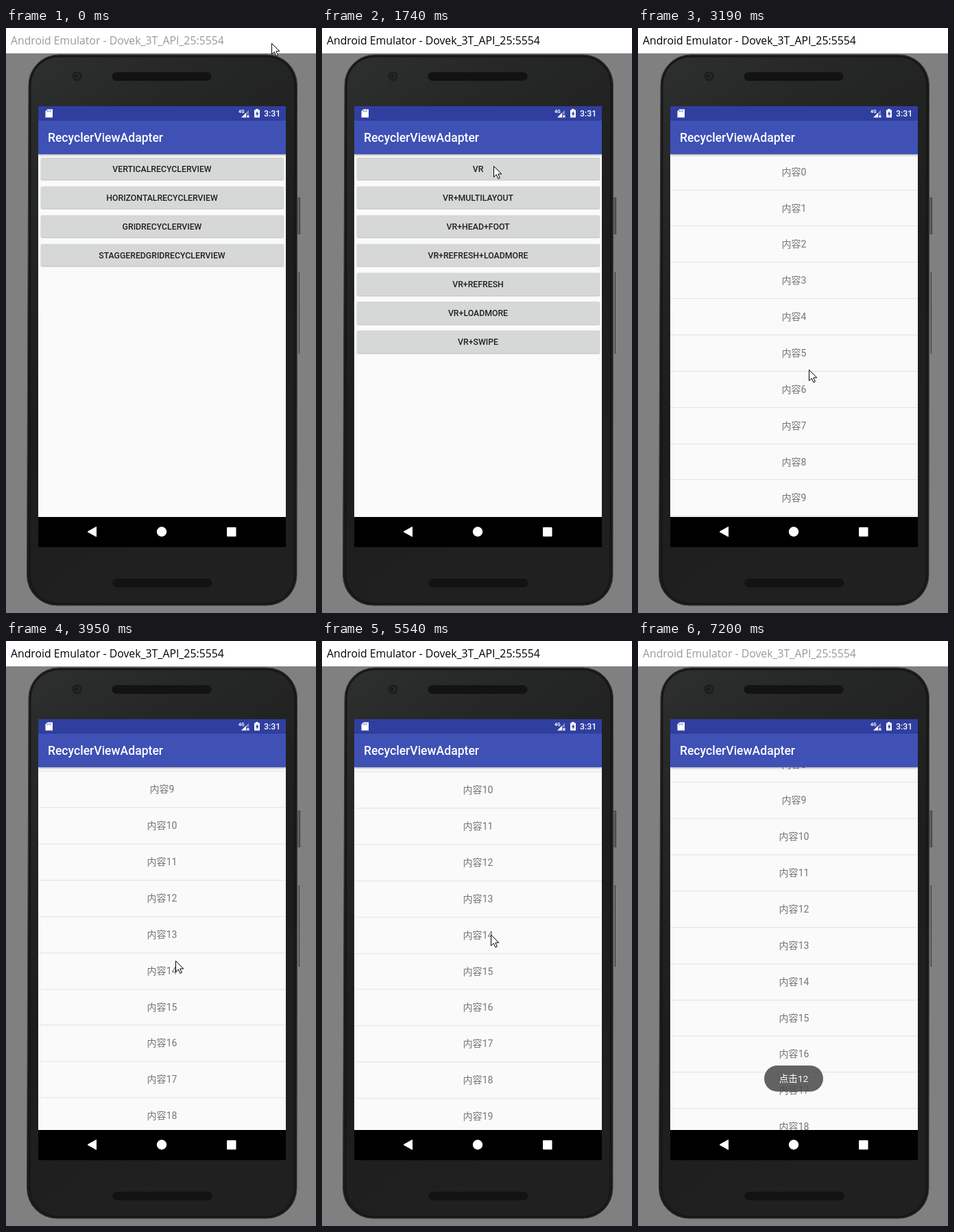
Write an HTML page that moves like this. It is 452 px wide and 853 px high and loops after 7330 ms.

```html
<!DOCTYPE html>
<html lang="zh-CN">
<head>
<meta charset="utf-8">
<title>RecyclerViewAdapter</title>
<style>
html, body { margin: 0; width: 100%; height: 100%; overflow: hidden; background: #808080; }
#stage { position: relative; width: 452px; height: 853px; overflow: hidden; background: #808080;
  font-family: Roboto, "Noto Sans CJK SC", "Noto Sans CJK", sans-serif; }
#stage > *, .page, .page > *, .nav, .icons, .time { position: absolute; }
svg { display: block; left: 0; top: 0; }
#title { left: 0; top: 0; width: 445px; height: 37px; padding-left: 7px; background: #fff; color: #999;
  font: 15.8px/37px "Open Sans", "Noto Sans", sans-serif; white-space: nowrap; }
#title.on { color: #000; }
#screen { left: 47px; top: 114px; width: 361px; height: 643px; overflow: hidden; background: #000; }
.page { left: 0; top: 0; width: 361px; height: 599px; background: #fafafa; overflow: hidden; }
.status { left: 0; top: 0; width: 361px; height: 21px; background: #303f9f; }
.bar { left: 0; top: 21px; width: 347px; height: 49px; padding-left: 14px; background: #3f51b5; color: #fff;
  font-size: 17.56px; font-weight: 500; line-height: 50px; box-shadow: 0 1px 3px rgba(0,0,0,.4); }
.btn { left: 3.5px; width: 354px; height: 32.5px; border-radius: 2px; background: #d6d7d7; color: #212121;
  font-size: 12.29px; font-weight: 500; line-height: 34px; text-align: center; box-shadow: 0 1px 2px rgba(0,0,0,.28); }
.list { left: 0; top: 69.7px; width: 361px; }
.item { box-sizing: border-box; height: 52.86px; border-bottom: 1.2px solid #e2e2e2; color: #757575;
  font-size: 14.05px; line-height: 53px; text-align: center; }
.time { left: 329px; top: 0; color: #fff; font-size: 12.3px; font-weight: 500; line-height: 22px; }
#toast { left: 184px; top: 619px; width: 86px; height: 38px; border-radius: 19px; background: rgba(78,78,78,.88);
  color: #fff; font-size: 13.6px; line-height: 38px; text-align: center; }
</style>
</head>
<body>
<div id="stage">
  <svg width="452" height="853" viewBox="0 0 452 853">
    <defs>
      <linearGradient id="body" x1="0" y1="0" x2=".35" y2="1">
        <stop offset="0" stop-color="#2e2f2f"/><stop offset=".2" stop-color="#262727"/>
        <stop offset=".6" stop-color="#1d1d1d"/><stop offset="1" stop-color="#202020"/>
      </linearGradient>
      <pattern id="mesh" width="4" height="4" patternUnits="userSpaceOnUse">
        <rect width="4" height="4" fill="#161616"/>
        <circle cx="1" cy="1" r=".8" fill="#050505"/><circle cx="3" cy="3" r=".8" fill="#050505"/>
      </pattern>
    </defs>
    <path d="M425 247h3.500v54h-3.500z" fill="#5c5c5c"/><path d="M425 356h2v119h-2z" fill="#777"/>
    <path d="M428.500 247v54M427.500 356v119" stroke="#3a3a3a"/>
    <path d="M33 83A44 44 0 0 1 77 39H380.500A44 44 0 0 1 424.500 83L424 798A44 44 0 0 1 380 842H74.500A44 44 0 0 1 30.500 798Z"
      fill="#1a1a1a" stroke="#3c3c3c"/>
    <path d="M36 83A41 41 0 0 1 77 42H380A41 41 0 0 1 421 83L420 798A41 41 0 0 1 379 839H76A41 41 0 0 1 35 798Z"
      fill="url(#body)" stroke="#121212"/>
    <circle cx="103.500" cy="70.500" r="7" fill="#1e1e1e"/>
    <circle cx="103.500" cy="70.500" r="4" fill="#262829"/><circle cx="102.500" cy="70.500" r="2" fill="#141414"/>
    <rect x="155" y="65" width="144" height="11.500" rx="5.500" fill="url(#mesh)" stroke="#111"/>
    <rect x="156" y="803.500" width="144" height="11.500" rx="5.500" fill="url(#mesh)" stroke="#111"/>
  </svg>
  <div id="title">Android Emulator - Dovek_3T_API_25:5554</div>
  <div id="screen">
    <div class="page" id="home"></div>
    <svg class="nav" width="361" height="643"><rect y="599" width="361" height="44" fill="#000"/></svg>
    <div class="page" id="menu"></div>
    <div class="page" id="feed"></div>
    <svg class="icons" width="361" height="643" fill="#fff">
      <path d="M13.500 4.500h7.500v12h-10.500v-9z"/>
      <path d="M13.500 6v2.500M15.800 6v2.500M18 6v2.500" stroke="#303f9f" stroke-width=".8"/>
      <text x="292" y="10" font-size="6.800" font-weight="700">4G</text>
      <path d="M296 16.500L303 9.500V16.500z"/><path d="M303 9.500l4-4v6h-4z" opacity=".4"/>
      <path d="M304 13l3.500 3.500m0-3.500l-3.500 3.500" stroke="#fff" stroke-width="1.200"/>
      <path d="M315 5.500h2.200V4h3.400v1.500h2.400V16.500h-8z"/>
      <path d="M319.800 7l-3 4.500h1.800V15l3-4.800h-1.800z" fill="#303f9f"/>
      <path d="M72 620.500L84.500 613.500V627.500z" stroke="#fff" stroke-linejoin="round"/>
      <circle cx="180" cy="620.500" r="7.200"/>
      <rect x="275" y="614" width="13.500" height="13.500" rx="1"/>
    </svg>
    <div class="time">3:31</div>
  </div>
  <div id="toast">点击12</div>
  <svg id="cursor" width="14" height="21" viewBox="0 0 14 21">
    <path d="M.5 .5V16.300L4.200 12.800L6.900 18.700L9.400 17.600L6.800 11.900H11.800Z" fill="#fff" stroke="#000"/>
  </svg>
</div>
<script>
const $ = id => document.getElementById(id);
const clamp = v => Math.max(0, Math.min(1, v));
const LOOP = 7330, STEP = 73;
const header = '<div class="status"></div><div class="bar">RecyclerViewAdapter</div>';
const buttons = names => names.map((name, i) =>
  `<div class="btn" style="top:${74.5 + i * 42.14}px">${name}</div>`).join('');

$('home').innerHTML = buttons(['VERTICALRECYCLERVIEW', 'HORIZONTALRECYCLERVIEW',
  'GRIDRECYCLERVIEW', 'STAGGEREDGRIDRECYCLERVIEW']) + header;
$('menu').innerHTML = buttons(['VR', 'VR+MULTILAYOUT', 'VR+HEAD+FOOT', 'VR+REFRESH+LOADMORE',
  'VR+REFRESH', 'VR+LOADMORE', 'VR+SWIPE']) + header;
$('feed').innerHTML = '<div class="list" id="list">' +
  Array.from({ length: 40 }, (_, i) => `<div class="item">内容${i}</div>`).join('') + '</div>' + header;

// Turning points of the pointer: [step, x, y]
const stops = [[0, 387, 22], [8, 275, 548], [18, 250, 201], [32, 250, 201], [37, 253, 237],
  [46, 248, 590], [54, 247, 466], [58, 252, 575], [66, 254, 460], [70, 250, 330],
  [76, 246, 428], [80, 250, 390], [86, 250, 390], [92, 409, 71]];

function pointer(k) {
  const i = stops.findIndex(s => s[0] > k);
  if (i < 0) return stops[stops.length - 1].slice(1);
  const [k0, x0, y0] = stops[i - 1], [k1, x1, y1] = stops[i];
  const p = (k - k0) / (k1 - k0), e = p * p * (3 - 2 * p);
  return [x0 + (x1 - x0) * e, y0 + (y1 - y0) * e];
}

// A swipe that slows down from its start
const fling = (k, from, length) => 1 - (1 - clamp((k - from) / length)) ** 2.54;
const scroll = k => 545 * fling(k, 47, 13) + 294.5 * fling(k, 60, 9) - 386.8 * fling(k, 70, 12.1);

// A page fades in while it rises, in three steps
function enter(page, n) {
  const rest = (1 - clamp(n / 3)) ** 2;
  page.style.visibility = n < 0 ? 'hidden' : 'visible';
  page.style.opacity = 1 - .72 * rest;
  page.style.transform = `translateY(${Math.round(41 * rest)}px)`;
}

function draw(now) {
  const t = now % LOOP, k = Math.floor((t + 12) / STEP);
  const [x, y] = pointer(k);
  $('cursor').style.transform = `translate(${Math.round(x)}px,${Math.round(y)}px)`;
  $('cursor').style.visibility = k < 93 ? 'visible' : 'hidden';
  $('title').className = k >= 19 && t < 7200 ? 'on' : '';
  enter($('menu'), k - 21);
  enter($('feed'), k < 38 ? -1 : k - 37);
  $('list').style.transform = `translateY(${-scroll(k)}px)`;
  $('toast').style.opacity = clamp((k - 85) / 3);
}

const start = performance.now();
function tick() {
  draw(performance.now() - start);
  requestAnimationFrame(tick);
}
tick();
</script>
</body>
</html>
```
